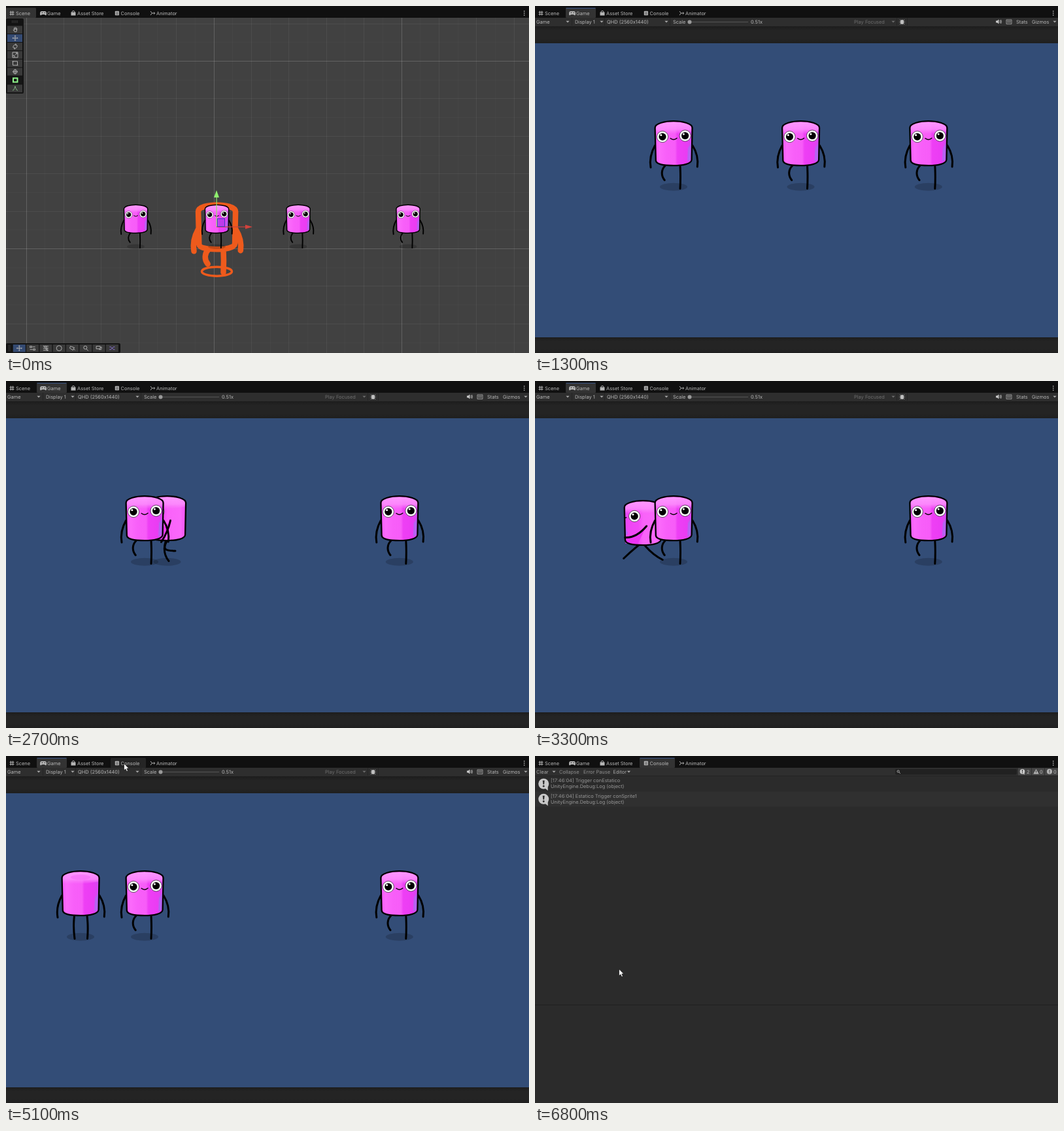
Recreate the animation shown at these times as an HTML page. Size 800 by 531 pixels, loop 7 s.

```html
<!DOCTYPE html>
<html lang="en">
<head>
<meta charset="utf-8">
<title>Scene, game and console</title>
<style>
  html, body { margin: 0; width: 100%; height: 100%; overflow: hidden; background: #2b2b2b; }
  svg { display: block; width: 100vw; height: 100vh; }
  text { font: 7.45px Inter, "Liberation Sans", sans-serif; fill: #b6b6b6; text-rendering: geometricPrecision; }
  .limb { fill: none; stroke: #000; stroke-width: 3; stroke-linecap: round; stroke-linejoin: round; }
  .icon { fill: none; stroke: #b0b0b0; stroke-width: 1; }
</style>
</head>
<body>
<svg id="stage" viewBox="0 0 800 531" preserveAspectRatio="none">
  <defs>
    <linearGradient id="skin">
      <stop offset="0" stop-color="#f257f6"/><stop offset=".12" stop-color="#fb6afb"/>
      <stop offset=".32" stop-color="#f85ff9"/><stop offset=".54" stop-color="#f75cf8"/>
      <stop offset=".6" stop-color="#ee3ff5"/><stop offset=".84" stop-color="#ea3cf3"/>
      <stop offset="1" stop-color="#d14bf0"/>
    </linearGradient>
    <linearGradient id="skinSide">
      <stop offset="0" stop-color="#d94df2"/><stop offset=".1" stop-color="#ef45f5"/>
      <stop offset=".38" stop-color="#f14af6"/><stop offset=".5" stop-color="#f962f9"/>
      <stop offset=".85" stop-color="#fa68fa"/><stop offset="1" stop-color="#f052f4"/>
    </linearGradient>
    <linearGradient id="shine" x2="0" y2="1">
      <stop offset="0" stop-color="#ff98ff"/><stop offset=".6" stop-color="#fc8dfc" stop-opacity=".85"/>
      <stop offset="1" stop-color="#fa7dfa" stop-opacity="0"/>
    </linearGradient>
    <linearGradient id="band" x2="0" y2="1">
      <stop offset="0" stop-color="#1d1d1d"/><stop offset=".25" stop-color="#242424"/>
      <stop offset=".75" stop-color="#242424"/><stop offset="1" stop-color="#1f1f1f"/>
    </linearGradient>
  </defs>
</svg>
<script>
const LOOP = 7000, STEP = 100;
const stage = document.getElementById('stage');

const rect = (x, y, w, h, fill, extra = '') =>
  `<rect x="${x}" y="${y}" width="${w}" height="${h}" fill="${fill}" ${extra}/>`;
const label = (x, y, s, fill = '#b6b6b6') => `<text x="${x}" y="${y}" style="fill:${fill}">${s}</text>`;
const path = (d, fill) => `<path d="${d}" fill="${fill}"/>`;
const icon = (d, extra = '') => `<path class="icon" d="${d}" ${extra}/>`;
const limb = d => `<path class="limb" d="${d}"/>`;
const caret = (x, y = 24, fill = '#a8a8a8') => path(`M${x - 2.6} ${y - 1.3}h5.2l-2.6 2.8z`, fill);
const group = (id, body, extra = '') => `<g id="${id}" ${extra}>${body}</g>`;

// Character: origin is the middle of the top of the body.
const BODY = 'M-28.4 11C-28.6 4 -13 .7 0 .7S28.6 4 28.6 11L27.6 60C27 66 14 68.6 0 68.6S-26.4 67 -27.2 61Z';
const ARMS = ['M-28.5 38C-33 46 -37.3 58 -35 71.5', 'M29 38C34 46 38 58 36.3 70.5'];
const LEGS = {
  stand: ['M-9.5 69Q-11.5 86 -9 104', 'M10 69Q12 86 10.5 104'],
  liftLeft: ['M-13 69C-19 75 -19.5 84 -13.8 91', 'M10 69Q11 86 10 104'],
  liftRight: ['M-10 69Q-11 86 -10 104', 'M13 69C19 75 19.5 84 13.8 91'],
  stride: ['M-7 69Q-18 78 -29.5 89', 'M2 68Q14 83 30 91'],
  pass: ['M-2 69Q-8 87 2.5 100', 'M0 69C-9 84 0 84 12.5 84.5']
};

const shadow = '<ellipse cx="0" cy="101.3" rx="21" ry="6" fill="#000" opacity=".18"/>';
const eye = (x, y) => `<circle cx="${x}" cy="${y}" r="8.6" fill="#fff" stroke="#222" stroke-width=".7"/>
  <circle cx="${x}" cy="${y}" r="5.6"/><circle cx="${x - 2.2}" cy="${y - 2.6}" r="1.5" fill="#fff"/>`;
const face = eye(-17, 24.6) + eye(17.6, 23) +
  '<path class="limb" style="stroke-width:1.5" d="M-4.8 27Q0 31 5 26.8"/>';
const rim = '<ellipse cx="0" cy="10" rx="15" ry="4" fill="#f36df5" opacity=".6"/>';

function torso(skin, detail) {
  return `<path d="${BODY}" fill="url(#${skin})"/>
    <path d="M-27.5 11C-27 5 -13 2 0 2S27 5 27.5 11L27 17Q0 22 -27 20Z" fill="url(#shine)"/>
    ${detail}<path d="${BODY}" fill="none" stroke="#000" stroke-width="2.3"/>`;
}

const tint = '<path d="M22 42L27 34L26.5 59L21 63Z" fill="#a96cf2" opacity=".75"/>';

function upright(legs, detail) {
  return shadow + LEGS[legs].map(limb).join('') + torso('skin', tint + detail) + ARMS.map(limb).join('');
}

function sideways(legs, arm) {
  const detail = path('M5 40L-18 57L-27 59V66L-8 67Z', '#ec35f3') +
    path('M-27 42L-23 50L-27 56Z', '#b563f2') + eye(-13, 24.4) +
    '<path class="limb" style="stroke-width:1.5" d="M-28 27.2l2.6-.8"/>';
  return LEGS[legs].map(limb).join('') + torso('skinSide', detail) + limb(arm);
}

const POSES = {
  front: upright('stand', rim + face),
  frontLeft: upright('liftLeft', face),
  frontRight: upright('liftRight', face),
  back: upright('stand', rim),
  backLeft: upright('liftLeft', rim),
  backRight: upright('liftRight', rim),
  stride: `<g transform="translate(0 7)">${sideways('stride', 'M5.5 39.5Q-10 58 -27.5 57')}</g>`,
  pass: shadow + sideways('pass', 'M5 38Q1 56 -9 71')
};

const place = (x, y, body, scale = 1) => `<g transform="translate(${x} ${y}) scale(${scale})">${body}</g>`;

// Window chrome
const TABS = { scene: [0, 46], game: [47, 46], console: [160, 54] };

function chrome() {
  const tabs = Object.entries(TABS).map(([name, [x, w]]) =>
    group('tab-' + name, rect(x, 3, w, 15, '#333', 'rx="1.5"') +
      rect(x + .5, 2.8, w - 1, 1, name === 'scene' ? '#333' : '#3f5a8c'))).join('');
  return rect(0, 0, 800, 18, '#101010') + rect(160, 3, 54, 15, '#252525', 'id="hover" rx="1.5"') + tabs +
    icon('M7.5 7.5v7M10.5 7.5v7M5.5 9.5h7M5.5 12.5h7') + label(15, 13.6, 'Scene') +
    path('M54.5 8h5q2.5 0 2.5 4t-3 1h-4q-3 3-3-1t2.500-4z', '#b6b6b6') +
    path('M54.500 9.800h2v1h-2zM58.700 9.800h1.300v1.300h-1.300z', '#222') + label(63, 13.6, 'Game') +
    path('M99.500 9.500h7v5h-7z', '#b6b6b6') + icon('M101 10V8.500q2-2.500 4 0V10') + label(109, 13.6, 'Asset Store') +
    rect(166.800, 7.800, 6.200, 6.500, '#b6b6b6', 'rx=".8"') + icon('M168 9.700h4M168 11.200h4M168 12.700h4', 'style="stroke:#333;stroke-width:.6"') +
    label(175.500, 13.6, 'Console') +
    icon('M221 8l2.500 3l-2.500 3M223.500 11h4M226 9.500l1.800 1.500l-1.800 1.500') + label(230, 13.6, 'Animator') +
    [8, 11, 14].map(y => rect(792, y - .700, 1.400, 1.400, '#c4c4c4')).join('');
}

// Scene view
function grid() {
  let out = '';
  const line = (vertical, at, k) => {
    const alpha = k % 10 === 0 ? .17 : k % 2 ? .025 : .06;
    out += vertical ? rect(at, 18, 1, 513, '#fff', `opacity="${alpha}"`)
      : rect(0, at, 800, 1, '#fff', `opacity="${alpha}"`);
  };
  for (let k = -1; k < 27; k++) line(true, Math.round(30.500 + k * 28.700), k);
  for (let k = -2; k < 16; k++) line(false, Math.round(84 + k * 28.700), k);
  return out;
}

const TOOL_ICONS = [
  'M-3 0l2 3h3l1-5M-1.500 1v-4M0 0v-4M1.500 0v-3.500', 'M-4 0h8M0-4v8M-3-1l-1 1l1 1M3-1l1 1l-1 1M-1-3l1-1l1 1M-1 3l1 1l1-1',
  'M-3 2a4 4 0 0 1 4-5M3-2a4 4 0 0 1-4 5M0-4l2 1l-1 2M0 4l-2-1l1-2', 'M-4-4h8v8h-8zM-4 1h3v3M0 0l3-3M1-3h2v2',
  'M-3.500-3h7v6h-7zM-4.500-3h2M2.500 3h2', 'M-3 0a3 3 0 1 0 6 0a3 3 0 1 0-6 0M-4 0h8M0-4v8', '',
  'M-4 3l2-1l2-5l2 5l2 1M-1-3h2'
];
const BAR_ICONS = [TOOL_ICONS[1], 'M-4-3h3v2h-3zM0-2h4M-4 2h4M1 1h3v2h-3z', 'M-4-3h8M-4 0h8M-4 3h8M-3-4l5 8M0-4l3 8',
  'M-4 0a4 4 0 1 0 8 0a4 4 0 1 0-8 0', 'M-3-3l6 2l-2 4l-5-3zM1 0l3 3', 'M-3-1a2.500 2.500 0 1 0 5 0a2.500 2.500 0 1 0-5 0M1 1l3 3',
  'M-4-3h6v4h-6zM2-1l2-1v3M0 2h4', 'M-4-2h2l4 4h2M-4 2h2l4-4h2'];

function sceneView() {
  const tools = TOOL_ICONS.map((d, i) => {
    const y = 36.300 + i * 12.850;
    return rect(2, y - 5.900, 23, 11.800, i === 1 ? '#344a72' : i === 6 ? '#161616' : '#393939') +
      (i === 6 ? rect(11, y - 3, 6.500, 6, 'none', 'stroke="#8ef58a" stroke-width="2"')
        : place(14, y, icon(d, i === 7 ? 'style="stroke:#7dac7d"' : '')));
  }).join('');
  const bar = BAR_ICONS.map((d, i) => {
    const x = 20.300 + i * 20.300;
    return rect(x - 9.500, 518, 19, 11.500, i ? '#393939' : '#344a72') +
      place(x, 523.700, icon(d, i === 7 ? 'style="stroke:#8c74d8"' : ''));
  }).join('');
  const figure = x => place(x, 303.700, POSES.frontLeft, .637);
  const halo = `<g fill="none" stroke="#ee5a1c" stroke-linecap="round">
    <ellipse cx="0" cy="102.500" rx="23" ry="7" stroke-width="3.500"/>
    <path stroke-width="8.500" d="${BODY}${ARMS.join('')}${LEGS.liftLeft.join('')}"/></g>`;
  const gizmo = rect(321.500, 293, 1.200, 45, '#8fe36b') + path('M322 282l4 11h-8z', '#8ff06e') +
    rect(322, 337.400, 44, 1.200, '#c8413c') + path('M377 338l-11-3.300v6.600z', '#d2423c') +
    rect(323.500, 325.500, 11, 12, '#3030d0', 'fill-opacity=".25" stroke="#3f3fc0"');
  return rect(0, 18, 800, 513, '#414141') + grid() +
    figure(198.500) + place(322.500, 303.700, halo) + figure(322.500) + figure(447) + figure(615) + gizmo +
    rect(0, 19, 27, 115, '#131313', 'rx="2"') + icon('M9 23h10M9 25h10', 'style="stroke:#555;stroke-dasharray:1 1"') + tools +
    rect(0, 516, 175, 15, '#131313', 'rx="2"') + icon('M4 519v9M6 519v9', 'style="stroke:#555;stroke-dasharray:1 1"') + bar;
}

// Game view
function gameView() {
  const dim = '#6d6d6d';
  const bar = rect(0, 18, 800, 13, '#2e2e2e') +
    [56, 106, 206, 553, 569].map(x => rect(x, 18, .700, 12, '#222')).join('') +
    label(2, 26.700, 'Game') + caret(50) + label(61, 26.700, 'Display 1') + caret(102) +
    label(110, 26.700, 'QHD (2560x1440)') + caret(201) + label(211, 26.700, 'Scale') +
    rect(236, 24, 90, 1, '#555') + '<circle cx="236.500" cy="24.500" r="3" fill="#999"/>' +
    label(330, 26.700, '0.51x') + label(488, 26.700, 'Play Focused', dim) + caret(548, 24, dim) +
    icon('M558 21l2 2M565 21l-2 2M557.500 24.500h8M558 28l2-2M565 28l-2-2') +
    '<ellipse cx="561.500" cy="24.500" rx="2.500" ry="3.600" fill="#c0c0c0"/>' +
    path('M705 22.500h2l2.500-2v7l-2.500-2h-2z', '#c8c8c8') + icon('M711 22q1.500 2 0 4M712.500 21q2 3 0 6') +
    icon('M721 21h8v6.500h-8zM722 23h6M722 25h6', 'style="stroke-width:.8"') +
    label(736, 26.700, 'Stats') + label(760, 26.700, 'Gizmos') + caret(795);
  const walker = Object.entries(POSES).map(([name, body]) => group('pose-' + name, body)).join('');
  return bar + rect(0, 31, 800, 26, 'url(#band)') + rect(0, 57, 800, 450, '#334d77') +
    rect(0, 507, 800, 24, 'url(#band)') + group('walker', walker) +
    place(212, 175.500, POSES.frontLeft) + place(601.800, 175.500, POSES.frontLeft);
}

// Console view
const bubble = (x, y, s) => place(x, y, `<circle r="8" fill="#c9c9c9"/>${path('M1 6l5.500 4.500V4z', '#c9c9c9')}
  ${path('M-1.500-5h3l-.7 6h-1.600z', '#2b2b2b')}<circle cy="3.700" r="1.400" fill="#2b2b2b"/>`, s);

function logRow(y, message, fill) {
  const grey = '#969696';
  return rect(0, y, 800, 23.300, fill) + bubble(13.200, y + 11.500, 1) +
    label(24, y + 9.200, '[17:46:04] ' + message, grey) +
    label(24, y + 18.200, 'UnityEngine.Debug:Log (object)', grey);
}

function consoleView() {
  const grey = '#8e8e8e';
  return rect(0, 18, 800, 513, '#2b2b2b') + rect(0, 18, 800, 12.500, '#2f2f2f') + rect(0, 30, 800, .800, '#222') +
    label(2, 26.700, 'Clear', '#a6a6a6') + caret(29) + label(37, 26.700, 'Collapse', grey) +
    label(74, 26.700, 'Error Pause', grey) + label(119.500, 26.700, 'Editor', '#a6a6a6') + caret(143.500) +
    rect(551, 20, 186, 8.500, '#212121', 'rx="2"') + icon('M554 23.500a1.600 1.600 0 1 0 3.200 0a1.600 1.600 0 1 0-3.200 0M557 25l1.800 1.800') +
    rect(739, 18.500, 20, 11, '#464646') + rect(760, 18.500, 19, 11, '#464646') + rect(780, 18.500, 20, 11, '#464646') +
    bubble(745.500, 23.700, .470) + label(752, 26.700, '2') +
    path('M766.500 20l4.200 7.500h-8.400z', '#b4b4b4') + rect(766, 22.500, 1, 3, '#333') + label(772, 26.700, '0') +
    '<circle cx="787" cy="23.800" r="4" fill="#b4b4b4"/>' + rect(786.500, 21.500, 1, 3, '#333') + rect(786.500, 25.300, 1, 1, '#333') +
    label(793, 26.700, '0') +
    logRow(31, 'Trigger conEstatico', '#2b2b2b') + logRow(54.300, 'Estatico Trigger conSprite1', '#303030') +
    rect(0, 380.500, 800, 1, '#212121');
}

stage.insertAdjacentHTML('beforeend',
  group('view-scene', sceneView()) + group('view-game', gameView()) + group('view-console', consoleView()) + chrome() +
  group('cursor', '<path d="M0 0V10.500L2.400 8.300L4.100 12L5.900 11.200L4.300 7.600H7.400Z" fill="#fff" stroke="#000" stroke-width=".6"/>'));

const byId = id => document.getElementById(id);
const show = (id, on) => { byId(id).style.display = on ? '' : 'none'; };

const VIEWS = [[0, 'scene'], [100, 'game'], [5200, 'console']];
const CURSOR = [[4900, 205, -5], [5000, 190, 4], [5100, 180.500, 11.500], [5700, 185, 9.500], [5800, 189.500, 8], [6200, 128.500, 326]];
const RUN = { start: 1520, end: 4000, from: 406.500, to: 114, speed: .1356 };
const last = (steps, t) => steps.filter(s => s[0] <= t).pop();

function poseAt(t) {
  const beat = Math.floor(t / 250) % 4;
  const step = (prefix, moving) => prefix + (moving ? ['', 'Left', '', 'Right'][beat] : '');
  if (t < RUN.start) return step('front', t >= 800);
  if (t < RUN.end) return (t - 1800) % 500 < 250 && t >= 1800 || t < 1550 ? 'stride' : 'pass';
  return step('back', t < 4800);
}

function draw(t) {
  const view = last(VIEWS, t)[1];
  for (const [, name] of VIEWS) {
    show('view-' + name, name === view);
    show('tab-' + name, name === view);
  }
  show('hover', view === 'game' && t >= 5000);
  const x = Math.max(RUN.to, RUN.from - Math.max(0, t - RUN.start) * RUN.speed);
  byId('walker').setAttribute('transform', `translate(${x} 175.500)`);
  const pose = poseAt(t);
  for (const name in POSES) show('pose-' + name, name === pose);
  const spot = last(CURSOR, t);
  show('cursor', spot);
  if (spot) byId('cursor').setAttribute('transform', `translate(${spot[1]} ${spot[2]})`);
}

const start = performance.now();
function tick() {
  const t = (performance.now() - start) % LOOP;
  draw(Math.floor(t / STEP) * STEP);
  requestAnimationFrame(tick);
}
tick();
</script>
</body>
</html>
```
